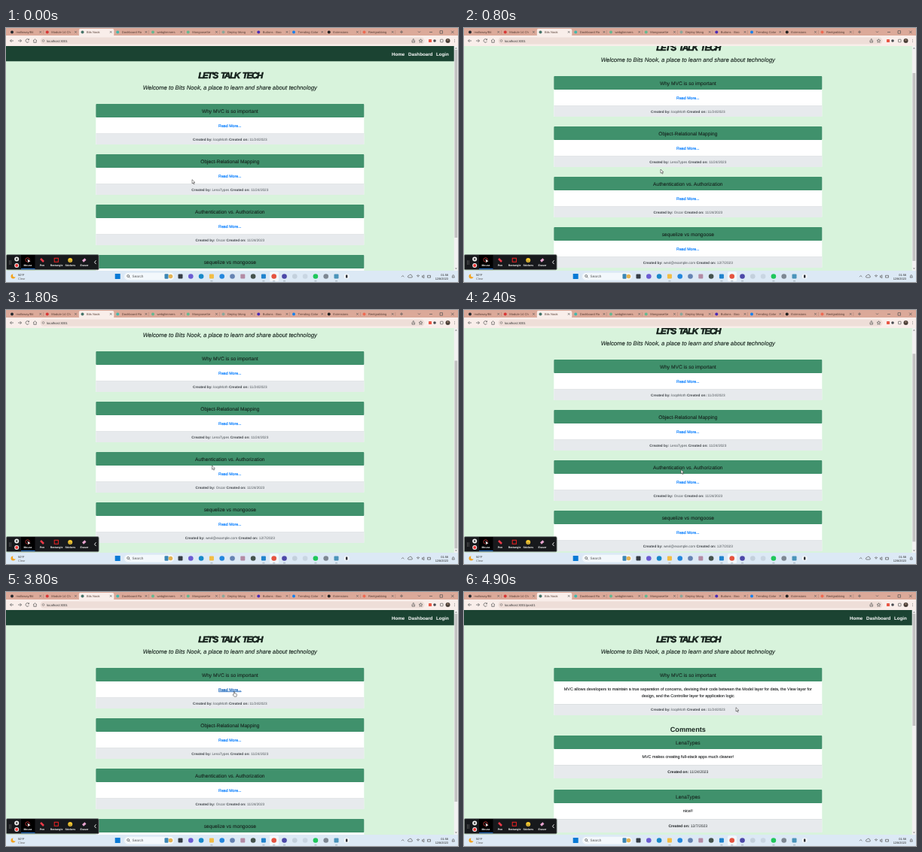
Write an HTML page that moves like this. It is 600 px wide and 338 px high and loops after 5000 ms.

```html
<!DOCTYPE html>
<html lang="en">
<head>
<meta charset="utf-8">
<title>Bits Nook</title>
<style>
html, body { margin: 0; width: 100%; height: 100%; overflow: hidden; background: #d8f3dc; }
svg { display: block; width: 600px; height: 338px; }
text { font-family: "Liberation Sans", Arial, sans-serif; text-rendering: geometricPrecision; white-space: pre; }
.mid { text-anchor: middle; }
.end { text-anchor: end; }
.bold, .foot tspan { font-weight: bold; }
.head { fill: #17251f; stroke: #17251f; stroke-width: .1; }
.link { fill: #007bff; stroke: #007bff; stroke-width: .17; }
.hover { fill: #0056b3; stroke: #0056b3; text-decoration: underline; }
.body { fill: #151819; stroke: #151819; stroke-width: .08; }
.foot { fill: #4d5459; }
.foot tspan { fill: #42474c; }
.dark, .dark tspan { fill: #1c2023; }
.title { font-weight: bold; font-style: italic; letter-spacing: -1.3px; word-spacing: 2px; fill: #14201b; stroke: #14201b; stroke-width: .6; }
.lead { font-style: italic; fill: #14201b; stroke: #14201b; stroke-width: .1; }
.line { fill: none; stroke: #555; stroke-width: .7; }
</style>
</head>
<body>
<svg id="stage" viewBox="0 0 600 338"></svg>
<script>
const rect = (x, y, w, h, fill, r = 0, more = '') =>
  `<rect x="${x}" y="${y}" width="${w}" height="${h}" fill="${fill}" rx="${r}" ${more}/>`;
const dot = (x, y, r, fill, more = '') => `<circle cx="${x}" cy="${y}" r="${r}" fill="${fill}" ${more}/>`;
const text = (x, y, size, str, cls = '', more = '') =>
  `<text x="${x}" y="${y}" font-size="${size}" class="${cls}" ${more}>${str}</text>`;
const line = (d, more = '') => `<path class="line" d="${d}" ${more}/>`;
const mid = 297.3;

// Card: green header, white body of height bodyH, grey footer of height footH
function card(y, title, bodyH, content, footH, footer, footClass = '') {
  const base = y + 18 + bodyH;
  return rect(119.3, y, 356, 18 + bodyH + footH, '#fff', 1) +
    rect(119.3, y, 356, 18, '#40916c', 1) +
    rect(119.3, base, 356, footH, '#e7eaed', 1) +
    rect(119.3, base, 356, .4, '#c9ced1') +
    text(mid, y + 11.6, 6.64, title, 'mid head') + content +
    text(mid, base + footH / 2 + 1.9, footClass ? 5.03 : 4.71, footer, 'mid foot ' + footClass);
}
const on = date => `<tspan>Created on:</tspan> ${date}`;
const by = (name, date) => `<tspan>Created by:</tspan> ${name} ${on(date)}`;

const intro = rect(0, 24, 600, 20.3, '#1b4332') +
  [[512, 'Home'], [534, 'Dashboard'], [571, 'Login']]
    .map(([x, s]) => text(x, 36.7, 6.2, s, 'bold', 'fill="#fff"')).join('') +
  text(mid + .3, 67.2, 11.6, 'LET\'S TALK TECH', 'mid title') +
  text(mid, 81.8, 7.75, 'Welcome to Bits Nook, a place to learn and share about technology', 'mid lead');

const posts = [
  ['Why MVC is so important', 'loopMoth', '11/24/2023'],
  ['Object-Relational Mapping', 'LenaTypes', '11/24/2023'],
  ['Authentication vs. Authorization', 'Oscar', '11/24/2023'],
  ['sequelize vs mongoose', 'wexl@example.com', '12/7/2023'],
];
const listPage = intro + posts.map(([title, name, date], i) => {
  const y = 101 + 67 * i;
  return card(y, title, 21.5, text(mid, y + 30.5, 5.28, 'Read More...', 'mid link'), 14.5, by(name, date));
}).join('');

const para = (y, s) => text(mid, y, 5.41, s, 'mid body');
const postPage = intro +
  card(101, posts[0][0], 30,
    para(131.4, 'MVC allows developers to maintain a true separation of concerns, devising their code between the Model layer for data, the View layer for') +
    para(140, 'design, and the Controller layer for application logic'), 15, by('loopMoth', '11/24/2023')) +
  text(mid, 185.6, 9.1, 'Comments', 'mid bold', 'fill="#17251f"') +
  card(191, 'LenaTypes', 21, para(221.3, 'MVC makes creating full-stack apps much cleaner!'), 18, on('11/24/2023'), 'dark') +
  card(263, 'LenaTypes', 21, para(293.3, 'nice!!'), 18, on('12/7/2023'), 'dark');

const tabs = [
  ['#24292f', 'molloway/Bit'], ['#d93636', 'Module 14 Ch'], ['#48756a', 'Bits Nook'],
  ['#43b8ad', 'Dashboard Ro'], ['#65b891', 'webglimmers'], ['#65b891', 'MongooseSe'],
  ['#8ba79b', 'Deploy Mong'], ['#4b2bb5', 'Buttons · Boo'], ['#1681ee', 'Trending Color'],
  ['#222', 'Extensions'], ['#ef6a52', 'Reelgrabbing'],
];
function browser() {
  let s = rect(0, 0, 600, 11, '#dba999') + rect(0, 10, 600, 14, '#f9eeea') +
    rect(96.8, 1, 46.5, 10, '#f9eeea', 2);
  tabs.forEach(([color, label], i) => {
    const x = 8 + 46.75 * i;
    s += dot(x, 5.5, 2, color) + text(x + 5.5, 7, 4.1, label, '', 'fill="#5a4038"') +
      line(`M${x + 36.5} 4.2l2.4 2.4m0-2.4l-2.4 2.4`, 'stroke-width=".5"');
    if (i != 1 && i != 2) s += rect(x + 41.2, 3, .4, 5, '#a77a6d');
  });
  s += line('M523 5.3h4m-2-2v4M547 4.5l1.5 1.5 1.5-1.5M562 5.5h4M576 3.7h3.5v3.5h-3.5zM591 3.7l3.5 3.5m0-3.5l-3.5 3.5') +
    line('M10 17H5.5m2-2l-2 2 2 2M16 17h4.5m-2-2l2 2-2 2M30.3 15.6a2.3 2.3 0 1 0 .2 2.3M30.5 14.3v1.6h-1.6M36 17l2.5-2.3L41 17M36.8 16.5v2.8h3.4v-2.8') +
    rect(45.5, 12.4, 510, 9.2, '#eeded8', 4.6) + dot(49.5, 17, 1.4, 'none', 'stroke="#555" stroke-width=".5"') +
    text(54, 18.5, 4.3, '', '', 'id="url" fill="#333"') +
    line('M539 16.3v2.8h3.5v-2.8M540.8 18v-3.5l-1 1m1-1l1 1') +
    line('M550.5 14.7l.7 1.5 1.7.2-1.2 1.1.3 1.7-1.5-.8-1.5.8.3-1.7-1.2-1.1 1.7-.2z', 'stroke-width=".4"') +
    rect(561, 15, 4, 4, '#e95745', .5) + dot(569, 17, 1.8, '#45494e') +
    rect(576.5, 15.2, 3.6, 3.6, 'none', .4, 'stroke="#444" stroke-width=".6"') +
    dot(586.5, 17, 3, '#4b4039') + dot(586.5, 16.1, 1, '#a88b77') +
    [15.2, 17, 18.8].map(y => dot(595.5, y, .45, '#555')).join('');
  return s;
}

function recorder() {
  let s = rect(.4, 301.6, 122.8, 20.2, '#17191c', 1.5, 'stroke="#8d9892" stroke-width=".8"') +
    rect(20, 302, 18.5, 19, '#000') + rect(20, 320, 18.5, 1, '#2c7cd8');
  for (let i = 0; i < 6; i++) s += dot(4.5 + i % 2 * 1.8, 310 + (i >> 1) * 2, .5, '#999');
  s += dot(14.2, 307.5, 3, '#eee') + rect(13.1, 306.4, 2.2, 2.2, '#333') +
    dot(14.2, 316, 3, '#eee') + dot(14.2, 316, 2, '#e33') +
    dot(28.6, 308.5, 2.7, 'none', 'stroke="#e44" stroke-width=".7"') +
    '<path d="M28.5 307.5l4 3-1.8.3-1 1.8z" fill="#fff"/>' +
    line('M46 307l4 4', 'style="stroke:#f13b49;stroke-width:2.5"') +
    rect(64.2, 306.3, 5.2, 5, 'none', 0, 'stroke="#e22" stroke-width="1"') +
    dot(85.2, 309, 3, '#f6c72e') + line('M83.6 309.6q1.6 2 3.2 0', 'stroke-width=".5"') +
    line('M102 310.5l3.5-3', 'style="stroke:#e7a4cf;stroke-width:3"') +
    line('M119.5 309.3l-2 2.4 2 2.4', 'style="stroke:#fff;stroke-width:.9"');
  [[29, 'Mouse'], [48, 'Pen'], [67, 'Rectangle'], [85.3, 'Stickers'], [104, 'Eraser']]
    .forEach(([x, label]) => s += text(x, 317.4, 3.5, label, 'mid bold', 'fill="#fff"'));
  return s;
}

const apps = ['#353c45', '#6b5bd2', '#1889c9', '#f3bd43', '#2387de', '#6583b2', '#b38ba4', '#45534d', '#2083cd',
  '#e5533f', '#4c48a8', '#c3d0dc', '#c9d6e2', '#1fc75b', '#7d8792', '#4a94ba', '#f8fafc'];
function taskbar() {
  let s = rect(0, 323, 600, 15, '#dce9f5') + dot(9.5, 330.5, 3, '#f3a31e') + dot(11.5, 329, 2.5, '#dce9f5') +
    text(16, 330, 3.9, '50°F', '', 'fill="#222"') + text(16, 334.6, 3.9, 'Clear', '', 'fill="#666"') +
    rect(144.7, 327, 7, 7, '#0879d5', .5) + rect(157, 325.7, 66, 9.8, '#f3f8fc', 4.9) +
    dot(162.2, 330, 1.5, 'none', 'stroke="#333" stroke-width=".6"') + line('M163.3 331.1l1.4 1.4') +
    text(167.5, 332, 4.7, 'Search', '', 'fill="#555"') +
    rect(210.5, 327.3, 5, 6.5, '#3c87b5', 1) + dot(218.5, 330.5, 2.8, '#e4b353') +
    rect(350, 324.3, 12, 12.6, '#f2f7fb', 1.5);
  apps.forEach((color, i) => {
    const x = 231.5 + 13.8 * i;
    s += [0, 3, 6, 8, 15].includes(i) ? rect(x - 3, 327.5, 6, 6, color, 1) : dot(x, 330.5, 3.3, color);
    if ([3, 8, 9, 10, 13, 15].includes(i)) s += rect(x - 1.5, 336.5, 3, .6, '#7a858f');
  });
  s += rect(451, 328.5, 2.4, 4, '#2b3037', .5) +
    line('M525 331.2l1.7-1.7 1.7 1.7M534 332a1.5 1.5 0 0 1 1-2.7 2 2 0 0 1 3.8.7 1.2 1.2 0 0 1 0 2zM545 329.8q2-2 4 0M546 331q1-1 2 0M552.5 329.8h1l1.3-1v4l-1.3-1h-1zM559.5 329.3h4v2.8h-4z') +
    text(587, 330, 3.9, '01:58', 'end', 'fill="#222"') + text(587, 334.8, 3.9, '12/8/2023', 'end', 'fill="#222"') +
    line('M592 332h3.4l-.6-1v-1.2a1.1 1.1 0 0 0-2.2 0v1.2z', 'stroke-width=".5"');
  return s;
}

const $ = id => document.getElementById(id);
$('stage').innerHTML = rect(0, 0, 600, 338, '#d8f3dc') +
  `<g id="list">${listPage}</g><g id="post">${postPage}</g>` +
  rect(594.7, 24, 5.3, 299, '#f1f1f1') + rect(595.5, 29, 3.7, 250, '#c1c1c1', 0, 'id="thumb"') +
  '<path d="M596 27.5l1.4-1.6 1.4 1.6zM596 319.5l1.4 1.6 1.4-1.6z" fill="#777"/>' +
  browser() + taskbar() + recorder() +
  '<path id="arrow" d="M0 0v5.2l1.2-1 .9 1.9 1-.4-.9-1.9h1.7z" fill="#fff" stroke="#222" stroke-width=".5"/>' +
  '<path id="hand" d="M-.6 3.6V.3a.6.6 0 0 1 1.2 0v2l2.3.5q.6.2.5 1l-.4 2.6H-.2L-2 4.2q.2-.9 1.4-.6z" fill="#fff" stroke="#222" stroke-width=".5"/>';
const link = document.querySelector('.link');

const scrolls = [[0, 0], [600, 0], [700, 22], [800, 37], [900, 43.5], [1000, 46], [2300, 46], [2400, 35],
  [2500, 9], [2600, 0]];
const pathX = [[0, 247], [800, 261], [1800, 273.5], [2400, 288], [2600, 288], [3000, 290], [3100, 300],
  [3300, 300], [3600, 303], [4300, 303], [4900, 361]];
const pathY = [[0, 201.7], [800, 188], [1800, 207], [2400, 212.5], [2600, 211], [3000, 192], [3100, 164.5],
  [3300, 164.5], [3600, 132.7], [4300, 132.7], [4900, 153.7]];

function at(keys, t) {
  const i = keys.findIndex(k => k[0] > t);
  if (i < 0) return keys[keys.length - 1][1];
  const [t0, a] = keys[i - 1], [t1, b] = keys[i];
  return a + (b - a) * (t - t0) / (t1 - t0);
}
const show = (el, visible) => el.setAttribute('display', visible ? 'inline' : 'none');

function draw(now) {
  const t = Math.floor(now % 5000 / 100) * 100;
  const scroll = at(scrolls, t), onPost = t >= 4200, over = t >= 3600 && !onPost;
  show($('list'), !onPost);
  show($('post'), onPost);
  $('list').setAttribute('transform', `translate(0 ${-scroll})`);
  $('thumb').setAttribute('y', 29 + scroll * 250 / 299);
  $('thumb').setAttribute('height', onPost ? 149 : 250);
  $('url').textContent = 'localhost:3001' + (onPost ? '/post/1' : '');
  link.classList.toggle('hover', over);
  show($('hand'), over);
  show($('arrow'), !over);
  for (const id of ['hand', 'arrow'])
    $(id).setAttribute('transform', `translate(${at(pathX, t)} ${at(pathY, t)})`);
  requestAnimationFrame(draw);
}
draw(0);
</script>
</body>
</html>
```
